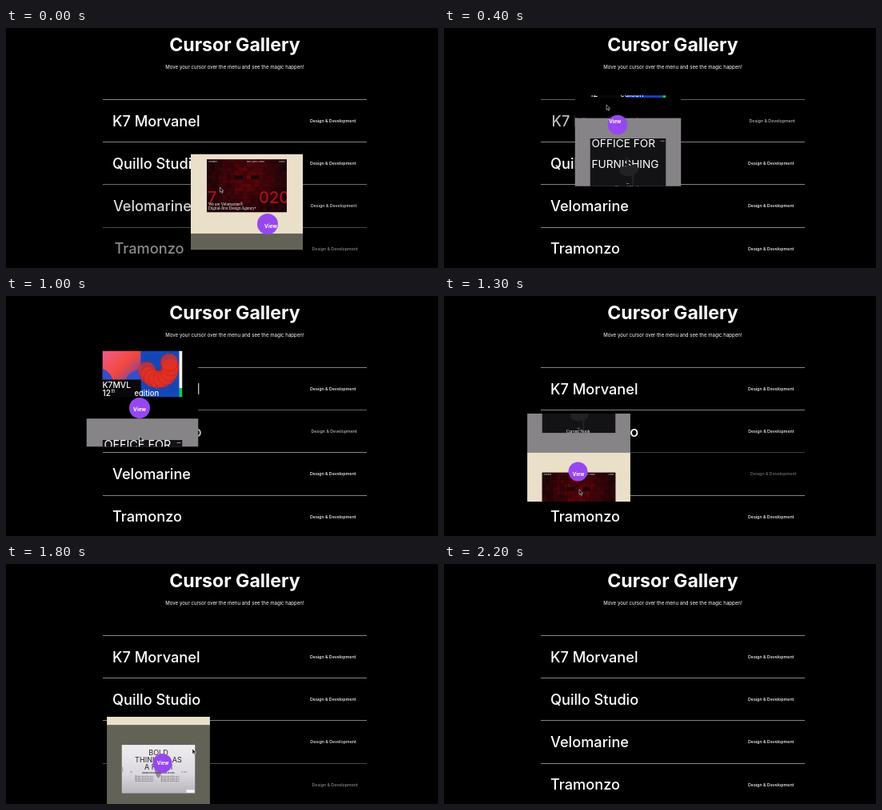
An HTML page that plays this animation: 540x300 px, repeating every 2800 ms.

```html
<!DOCTYPE html>
<html lang="en">
<head>
<meta charset="utf-8">
<title>Cursor Gallery</title>
<style>
  html, body { margin: 0; width: 100%; height: 100%; overflow: hidden; background: #000; }
  svg { display: block; }
  text { font-family: Inter, "Open Sans", sans-serif; fill: #fff; }
  .serif { font-family: "Liberation Serif", "Noto Serif", serif; }
  .mid { text-anchor: middle; }
</style>
</head>
<body>
<svg id="stage" width="540" height="300" viewBox="0 0 540 300">
  <defs>
    <clipPath id="window"><rect x="-70" y="-59.75" width="140" height="119.5"/></clipPath>
    <linearGradient id="coral" x2="1" y2="1">
      <stop stop-color="#f0609a"/><stop offset=".55" stop-color="#f2483f"/><stop offset="1" stop-color="#5c3fc0"/>
    </linearGradient>
    <linearGradient id="paper" x2="0" y2="1">
      <stop stop-color="#f0edf2"/><stop offset=".6" stop-color="#dcd8df"/><stop offset="1" stop-color="#b9b4bd"/>
    </linearGradient>
  </defs>
  <rect width="540" height="300"/>
  <text class="mid" x="286" y="29" font-size="23.1" font-weight="700">Cursor Gallery</text>
  <text class="mid" x="286" y="50.7" font-size="6.1">Move your cursor over the menu and see the magic happen!</text>
  <g id="rows"></g>
  <g id="modal" clip-path="url(#window)"><g id="slides"></g></g>
  <circle id="disc" r="13" fill="#9747f0"/>
  <g id="label"><text class="mid" y="2.3" font-size="6.5" font-weight="700">View</text></g>
  <path id="pointer" d="M0 0V6.4L1.5 5L2.6 7.4L3.6 7L2.5 4.7H4.5Z" stroke="#fff" stroke-width=".5"/>
</svg>
<script>
const LOOP = 2800, STEP = 100, GONE = 2200;
const SLIDE_H = 119.5, ROW_H = 53.2;
const el = id => document.getElementById(id);
const rect = (x, y, w, h, fill) => `<rect x="${x}" y="${y}" width="${w}" height="${h}" fill="${fill}"/>`;
const text = (x, y, size, str, attrs = '') => `<text x="${x}" y="${y}" font-size="${size}" ${attrs}>${str}</text>`;

function random(seed) {
  return () => (seed = (seed * 16807) % 2147483647) / 2147483647;
}

function posterArt() {
  let art = rect(0, 0, 49, 46, 'url(#coral)') + rect(48, 0, 49, 66, '#1546b8');
  art += '<path d="M0 30Q10 34 14 46H0ZM28 46Q32 34 48 30V46Z" fill="#3450c8"/>';
  for (let i = 0; i < 9; i++) {
    const a = 2.9 - i * 0.42;
    const x = 70 + 15 * Math.cos(a), y = 29 + 15 * Math.sin(a);
    art += `<circle cx="${x}" cy="${y}" r="11" fill="#e8301f" fill-opacity=".72" stroke="#8c1c30" stroke-width=".4"/>`;
  }
  return art + rect(0, 44, 48, 22, '#08080a') + rect(96, 0, 4, 55, '#f4f4f4') + rect(96, 55, 4, 11, '#18c850')
    + text(0, 54.5, 10.3, 'K7MVL', 'font-weight="500"')
    + text(0, 65, 10, '12', 'font-weight="500"') + text(11, 60.5, 5.5, 'th')
    + text(40, 65, 9.4, 'edition', 'font-weight="500"');
}

function furnitureArt() {
  return rect(0, 0, 100, 66, '#131316')
    + text(2, 11.5, 14.4, 'OFFICE FOR') + rect(93, 3, 5, 0.6, '#ddd')
    + text(2, 39, 14.4, 'FURNISHING')
    + '<path d="M46 25Q50 23 51 29V37Q57 32 63 37Q65 45 58 48L57 62H55.5L55 49Q45 51 40 46Q36 40 41 36Q46 39 48 36V29Z" fill="#222226"/>'
    + rect(48, 59, 3.5, 0.5, '#ddd') + text(49, 66, 6, 'Curved Nook', 'class="serif mid"');
}

function mosaicArt() {
  const next = random(77), cell = 5;
  let art = rect(0, 0, 100, 66, '#120406');
  for (let y = 0; y < 66; y += cell) {
    for (let x = 0; x < 100; x += cell) {
      const glow = Math.exp(-(((x - 48) / 34) ** 2) - ((y - 22) / 30) ** 2);
      const red = Math.round(18 + 75 * glow * (0.45 + 0.55 * next()) + 22 * next());
      art += rect(x, y, cell, cell, `rgb(${red},4,9)`);
    }
  }
  const big = 'fill="#000" style="fill:#a8101c" font-weight="500"';
  return art + rect(35, 20, 10, 5, '#1c0508') + rect(55, 20, 10, 5, '#1c0508')
    + text(1, 55, 20, '7', big) + text(65, 55, 20, '020', big)
    + text(2, 3.6, 2, 'Velomarine') + text(50, 3.6, 2, 'Work, Agency, Contact') + text(90, 3.6, 2, 'Contact')
    + text(2, 57.5, 5.2, 'We are Velomarine®', 'class="serif"')
    + text(2, 63, 5.2, 'Digital-first Design Agency•', 'class="serif"');
}

function statementArt() {
  const dark = 'class="mid" style="fill:#29272b"';
  let art = rect(0, 0, 100, 66, 'url(#paper)')
    + '<path d="M44 29H56Q54 43 50 45Q46 43 44 29Z" fill="#8d8892"/>';
  ['BOLD', 'THINKING AS', 'A FORM'].forEach((line, i) => art += text(50, 14 + i * 10, 9.9, line, dark));
  art += text(50, 39, 2.4, 'REFINED VISION FOR DIGITAL PLACES', dark + ' font-weight="700"');
  for (const x of [31, 66]) {
    for (let i = 0; i < 4; i++) art += text(x, 43.5 + i * 2, 1.6, 'We shape calm and clear spaces', dark);
  }
  return art + text(13, 38, 4, '‹›', dark) + text(85, 38, 2.4, '○ ○ ○', dark)
    + rect(0, 30, 2, 7, '#aaa6ae') + rect(88, 61, 11, 4, '#f6f5f7');
}

const slides = [
  ['#000', posterArt], ['#868487', furnitureArt], ['#eadfc9', mosaicArt], ['#636257', statementArt],
];
el('slides').innerHTML = slides.map(([fill, art], i) =>
  rect(-70, (i - 0.5) * SLIDE_H, 140, SLIDE_H + 0.1, fill) +
  `<svg x="-50" y="${i * SLIDE_H - 33}" width="100" height="66" viewBox="0 0 100 66">${art()}</svg>`).join('');

const names = ['K7 Morvanel', 'Quillo Studio', 'Velomarine', 'Tramonzo'];
el('rows').innerHTML = names.map((name, i) => {
  const y = i * ROW_H;
  return `<g>${rect(121, Math.round(89 + y), 330, 1, '#858585')}<g>`
    + text(133, 122.6 + y, 18.2, name, 'font-weight="500"')
    + text(380, 117.9 + y, 5.3, 'Design &amp; Development', 'font-weight="500"') + '</g></g>';
}).join('');
const rows = [...el('rows').children];

// Moments [time, height] at which each row is most strongly hovered.
const hovers = [
  [[410, 0.5], [800, 0.5]],
  [[200, 1], [1110, 0.95]],
  [[20, 0.3], [1300, 1], [1940, 0.4]],
  [[-60, 1], [1740, 1]],
];

// Tracks are keys of [time, ...values].
const pointerTrack = [[0, 267.5, 199], [200, 244, 155], [400, 203, 96], [600, 168, 73], [800, 165, 112],
  [1000, 167, 175], [1300, 169, 242], [1550, 188, 264], [1800, 233, 231], [2100, 474, 190]];
const discTrack = [[0, 327, 245], [200, 262, 180], [400, 217, 121], [600, 183, 90], [800, 169, 96],
  [1000, 167, 140], [1300, 167.5, 219.5], [1550, 174, 251], [1800, 195.5, 249], [2200, 450, 205]];
const labelOffset = [[0, 4, 3], [200, -2, -2], [600, -3, -4], [1000, 0, 2], [1300, 0.5, 3], [1800, 0.5, 0], [2200, 6, -2]];
const modalTrack = [[0, 301, 217.5], [200, 266.5, 185], [400, 230, 141], [600, 196.5, 104.5], [800, 178, 102],
  [1000, 170.5, 128.5], [1300, 168.5, 202], [1550, 172, 239], [1800, 190.5, 246], [2200, 340, 225]];
const slideTrack = [[0, 2.17], [200, 1.464], [400, 0.75], [600, 0.124], [800, 0.02], [1000, 0.293],
  [1300, 1.555], [1500, 2.1], [1800, 2.905], [2200, 2.6]];
const scaleTrack = [[0, 1], [200, 0.92], [400, 0.95], [600, 0.807], [800, 0.88], [1000, 1],
  [1300, 0.92], [1550, 0.95], [1800, 0.92], [2000, 0.45], [2200, 0]];

// Smooth curve through the keys (cubic Hermite).
function follow(track, t) {
  const last = track.length - 1;
  if (t >= track[last][0]) return track[last].slice(1);
  const i = track.findIndex(key => key[0] > t) - 1;
  const a = track[i], b = track[i + 1];
  const before = track[Math.max(i - 1, 0)], after = track[Math.min(i + 2, last)];
  const span = b[0] - a[0], u = (t - a[0]) / span;
  return a.slice(1).map((v, k) => {
    const w = b[k + 1];
    const m0 = (w - before[k + 1]) / (b[0] - before[0]) * span;
    const m1 = (after[k + 1] - v) / (after[0] - a[0]) * span;
    return v + u * (m0 + u * (3 * (w - v) - 2 * m0 - m1 + u * (2 * (v - w) + m0 + m1)));
  });
}

function hoverAmount(peaks, t) {
  return Math.max(...peaks.map(([at, height]) =>
    height * Math.cos(Math.min(Math.abs(t - at) / 220, 1) * Math.PI / 2) ** 2));
}

function place(node, [x, y], scale = 1) {
  node.setAttribute('transform', `translate(${x} ${y}) scale(${scale})`);
}

function draw(time) {
  const t = Math.floor(time / STEP) * STEP;
  rows.forEach((row, i) => {
    const h = hoverAmount(hovers[i], t);
    row.setAttribute('opacity', 1 - 0.55 * h);
    place(row.lastChild, [3 * h, 0]);
  });
  const visible = t < GONE;
  for (const id of ['modal', 'disc', 'label', 'pointer']) el(id).style.display = visible ? '' : 'none';
  if (!visible) return;
  const [scale] = follow(scaleTrack, t), disc = follow(discTrack, t), offset = follow(labelOffset, t);
  place(el('modal'), follow(modalTrack, t), scale);
  place(el('slides'), [0, -follow(slideTrack, t)[0] * SLIDE_H]);
  place(el('disc'), disc, scale);
  place(el('label'), [disc[0] + offset[0], disc[1] + offset[1]], scale);
  place(el('pointer'), follow(pointerTrack, t));
}

const start = performance.now();
function tick() {
  draw((performance.now() - start) % LOOP);
  requestAnimationFrame(tick);
}
tick();
</script>
</body>
</html>
```
